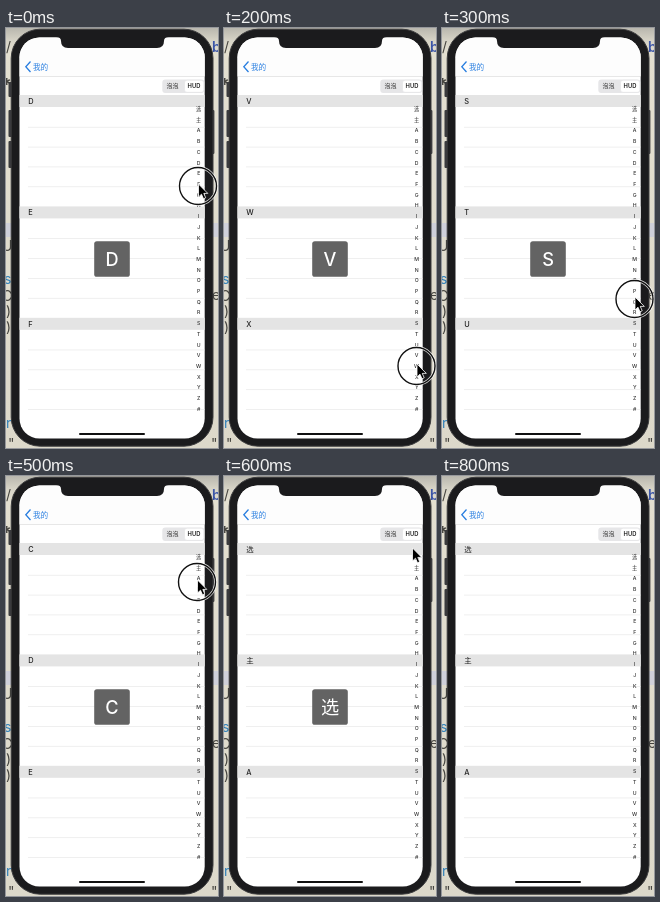
Animation, 212 px wide and 420 px high, one loop 900 ms. Source, as an HTML page:

```html
<!DOCTYPE html>
<html lang="zh">
<head>
<meta charset="utf-8">
<title>Section index</title>
<style>
html, body { margin: 0; width: 100%; height: 100%; overflow: hidden; background: #e0dccd; }
svg { display: block; width: 212px; height: 420px; }
text { font-family: Inter, "Noto Sans CJK SC", "Noto Sans CJK", sans-serif; }
.code { font-family: "Noto Sans", sans-serif; font-size: 14px; fill: #45443f; }
.code .key { fill: #2f7fb8; }
.mid { text-anchor: middle; }
</style>
</head>
<body>
<svg viewBox="0 0 212 420">
  <defs>
    <linearGradient id="desk" x2="0" y2="1">
      <stop offset="0" stop-color="#b9b7ae"/>
      <stop offset=".03" stop-color="#d6d3c6"/>
      <stop offset=".06" stop-color="#e3dfd0"/>
      <stop offset="1" stop-color="#dcd8ca"/>
    </linearGradient>
    <clipPath id="screen"><rect x="13.5" y="9.5" width="185.2" height="401" rx="20"/></clipPath>
    <clipPath id="table"><rect x="13" y="66.5" width="186" height="333.5"/></clipPath>
  </defs>

  <rect width="212" height="420" fill="url(#desk)"/>
  <rect y="195" width="212" height="14" fill="#cfd0da"/>
  <g class="code">
    <text x="0" y="24">/</text>
    <text x="-4" y="63" font-size="17" font-weight="700">*</text>
    <text x="-4" y="223">U</text>
    <text x="-2" y="256" class="key">s</text>
    <text x="-4" y="273">C</text>
    <text x="0" y="288">)</text>
    <text x="0" y="304">)</text>
    <text x="0" y="400" class="key">r</text>
    <text x="2" y="421">"</text>
    <text x="206" y="24" fill="#3b55a8" font-weight="600">b</text>
    <text x="206" y="272">e</text>
    <text x="205" y="421">"</text>
  </g>

  <g fill="#3a3b3d">
    <rect x="2.5" y="54" width="5" height="15" rx="1"/>
    <rect x="2.5" y="82" width="5" height="27" rx="1"/>
    <rect x="2.5" y="113" width="5" height="27" rx="1"/>
    <rect x="203" y="82" width="5.4" height="44" rx="1"/>
  </g>
  <rect x="5.2" y="1.2" width="201.8" height="417" rx="29" fill="#1b1b1d" stroke="#3c3c3e"/>

  <g clip-path="url(#screen)">
    <rect x="13" y="9" width="186" height="402" fill="#fff"/>
    <g clip-path="url(#table)"><g id="sections"></g></g>
    <rect x="13" y="9" width="186" height="39" fill="#fdfdfd"/>
    <rect x="13" y="48" width="186" height=".6" fill="#d8d8d8"/>
    <path d="M24.5 33.5L19.8 38.7L24.5 44" fill="none" stroke="#2a7fe0" stroke-width="1.3"/>
    <text x="27" y="41.8" font-size="7.6" fill="#2a7fe0">我的</text>
    <rect x="156.3" y="51.5" width="42" height="13.5" rx="3" fill="#e6e6e8"/>
    <rect x="178.5" y="52.3" width="19.3" height="12" rx="2.6" fill="#fff" stroke="#d9d9db" stroke-width=".4"/>
    <text class="mid" x="166.5" y="60.2" font-size="6" fill="#333">泡泡</text>
    <text class="mid" x="188" y="60.2" font-size="5.8" font-weight="600" fill="#222">HUD</text>
    <g id="index" class="mid" font-size="5.2" font-weight="500" fill="#333"></g>
    <rect x="73" y="405" width="66" height="2" rx="1" fill="#111"/>
  </g>
  <path d="M50 9Q55 9 55 13Q55 20 62 20H151Q158 20 158 13Q158 9 163 9Z" fill="#1b1b1d"/>

  <g id="hud">
    <rect x="88.2" y="213.2" width="35.6" height="35.6" rx="2.6" fill="#636363"/>
    <text id="hudLabel" class="mid" x="106" y="238" font-size="18.2" font-weight="500" fill="#fff"></text>
  </g>
  <g id="pointer">
    <g id="ring" fill="none">
      <circle cy="1" r="18.5" stroke="#fff" stroke-width="2.8" stroke-opacity=".85"/>
      <circle cy="1" r="18.5" stroke="#111" stroke-width="1.4"/>
    </g>
    <path d="M.5-1V12L3.5 9.2L5.5 13.8L7.7 12.8L5.8 8.4H9.8Z" fill="#000" stroke="#fff" stroke-width=".8"/>
  </g>
</svg>

<script>
const titles = [..."选主ABCDEFGHIJKLMNOPQRSTUVWXYZ#"];
const STEP = 100, LOOP = 900;
const SECTION = 111.4, HEADER = 12, ROW = 19.88, TOP = 67, INDEX_GAP = 10.71;
const poses = [
  { title: "D", x: 192, y: 157 },
  { title: "M", x: 192, y: 250 },
  { title: "V", x: 192.5, y: 337 },
  { title: "S", x: 192.5, y: 270 },
  { title: "K", x: 192.5, y: 174 },
  { title: "C", x: 191, y: 105 },
  { title: "选", x: 188, y: 73, released: true },
  { title: "选", x: 188, y: 73, released: true, hud: .48 },
  { title: "选", x: 188, y: 73, released: true, hud: 0, hidden: true }
];
const $ = id => document.getElementById(id);

function add(parent, tag, attrs, text = "") {
  const node = document.createElementNS("http://www.w3.org/2000/svg", tag);
  for (const key in attrs) node.setAttribute(key, attrs[key]);
  node.textContent = text;
  parent.append(node);
}

titles.forEach((title, i) => {
  const y = TOP + i * SECTION;
  add($("sections"), "rect", { x: 13, y, width: 186, height: HEADER, fill: "#e4e4e4" });
  add($("sections"), "text", { x: 22.3, y: y + 9, "font-size": 7.4, "font-weight": 500, fill: "#222" }, title);
  for (let row = 1; row < 5; row++) {
    add($("sections"), "rect", { x: 22, y: y + HEADER + row * ROW, width: 177, height: .6, fill: "#e4e4e4" });
  }
  add($("index"), "text", { x: 192.7, y: 83 + i * INDEX_GAP }, title);
});

function draw(now) {
  const pose = poses[Math.floor((now % LOOP) / STEP)];
  const { title, x, y, released, hidden, hud = 1 } = pose;
  const offset = -titles.indexOf(title) * SECTION;
  $("sections").setAttribute("transform", `translate(0 ${offset})`);
  $("hudLabel").textContent = title;
  $("hud").setAttribute("opacity", hud);
  $("pointer").setAttribute("transform", `translate(${x} ${y})`);
  $("pointer").setAttribute("opacity", hidden ? 0 : 1);
  $("ring").setAttribute("opacity", released ? 0 : 1);
}

const start = performance.now();
function tick() {
  draw(performance.now() - start);
  requestAnimationFrame(tick);
}
tick();
</script>
</body>
</html>
```
